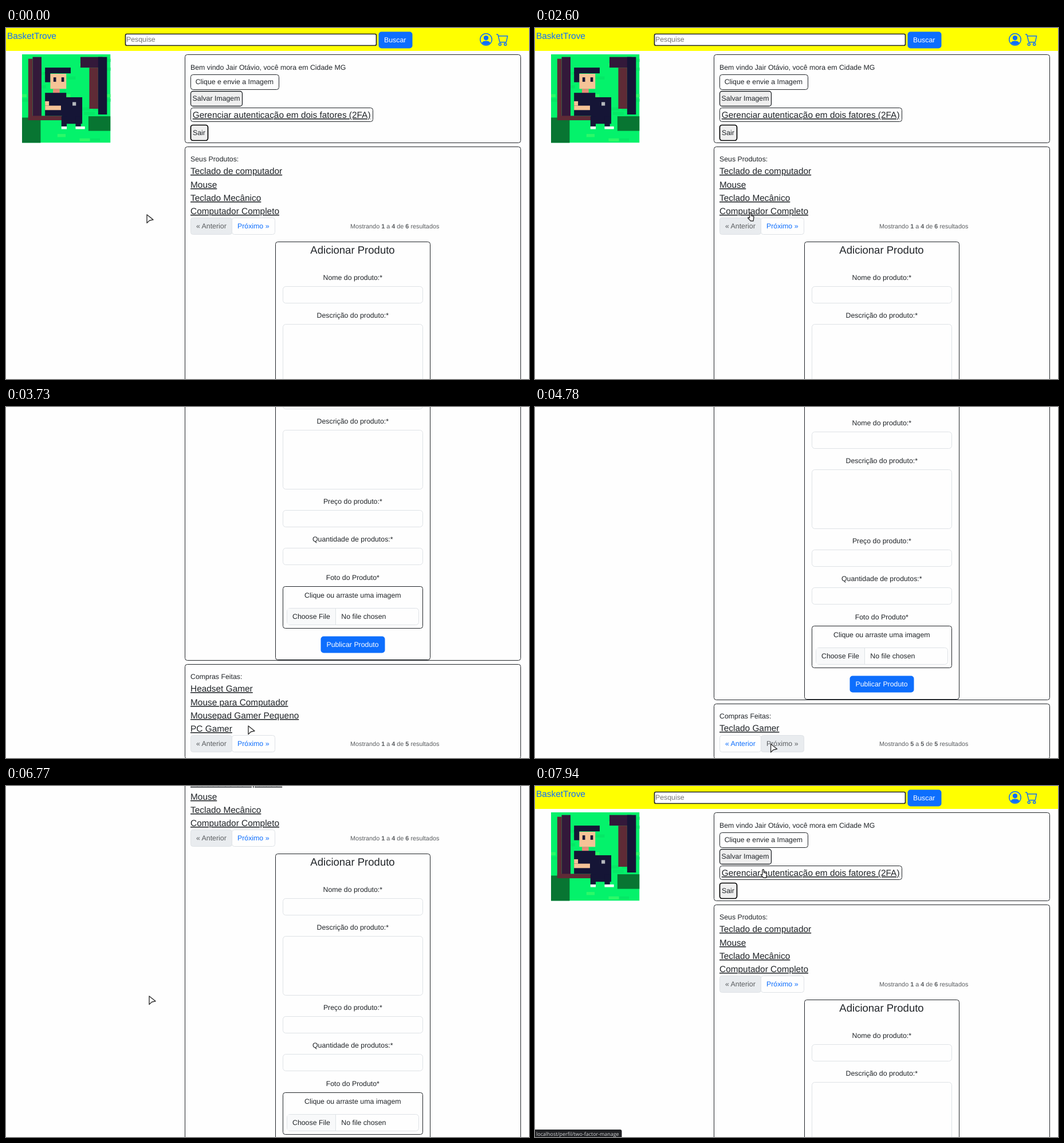
Animation of 913x613 px, one loop 8000 ms. Source, as an HTML page:

```html
<!DOCTYPE html>
<html lang="pt-BR">
<head>
<meta charset="utf-8">
<style>
html, body { margin: 0; width: 100%; height: 100%; overflow: hidden; background: #fefefe; }
svg { display: block; }
text { font: 12.34px "Liberation Sans", Arial, sans-serif; fill: #212529; text-rendering: geometricPrecision; }
.link { font-size: 15.42px; text-decoration: underline; }
.brand { font-size: 15.42px; }
.title { font-size: 18.55px; }
.small { font-size: 10.83px; }
.mid { text-anchor: middle; }
.muted { fill: #595c5f; }
.hint { fill: #757575; }
.blue { fill: #0d6efd; }
.white { fill: #fff; }
.box { fill: #fefefe; stroke: #212529; }
.button { fill: #efefef; stroke: #212529; stroke-width: 1.3; }
.strong { fill: #efefef; stroke: #000; stroke-width: 1.7; }
.search { fill: #fff; stroke: #212529; stroke-width: 1.7; }
.field { fill: #fefefe; stroke: #dee2e6; }
.off { fill: #e9ecef; stroke: #dee2e6; }
.icon { fill: none; stroke: #0d6efd; stroke-width: 1.5; stroke-linejoin: round; }
#cursor { pointer-events: none; }
#cursor path { fill: #fff; stroke: #333; stroke-width: 1.4; stroke-linejoin: round; }
#status text { font: 8.92px "Open Sans", sans-serif; fill: #d6d7d9; }
</style>
</head>
<body>
<svg width="913" height="613">
  <g id="page"></g>
  <g id="status"><rect x="-4" y="600" height="20" rx="3" fill="#202124"/><text x="2" y="611"></text></g>
  <g id="cursor">
    <path id="arrow" d="M1 1V15.5L5.5 11.3L12 9.8Z"/>
    <path id="hand" d="M4 9V2a1.3 1.3 0 0 1 2.6 0V6l5 1.5-1 7.8H6L1.4 10.6q-.7-2.2 2.6-.6z"/>
  </g>
</svg>
<script>
const LOOP = 8000, ROW = 23.1, SECTION = 719, BOTTOM = 477;
const $ = id => document.getElementById(id);
const crisp = v => Math.floor(v) + .5;
const rect = (cls, x, y, w, h, r = 4) =>
  `<rect class="${cls}" x="${crisp(x)}" y="${crisp(y)}" width="${Math.round(w)}" height="${Math.round(h)}" rx="${r}"/>`;
const block = (color, x, y, w, h) =>
  `<rect fill="${color}" x="${x}" y="${y}" width="${w}" height="${h}"/>`;
const text = (cls, x, y, s) => `<text class="${cls}" x="${x}" y="${Math.round(y)}">${s}</text>`;
const label = (y, s) => text('mid', 605.3, y, s);
const shift = (y, content) => `<g transform="translate(0 ${Math.round(y)})">${content}</g>`;

// Pixel-art portrait on a grid of 20 by 20 cells
function avatar() {
  const navy = '#151536', bark = '#5f2b36', shade = '#33193a', skin = '#f5c396', leaf = '#087532';
  const noise = n => { const v = Math.sin(n * 91.7) * 4375.5; return v - Math.floor(v); };
  let out = block('#04f26b', 0, 0, 20, 20);
  for (let i = 1; i < 34; i++)
    out += block(i % 4 ? '#05e766' : '#2cf968', Math.floor(noise(i) * 20), Math.floor(noise(i + 50) * 20), 1 + noise(i) * 2, .7);
  out += block(leaf, 0, 14.3, 4.2, 6) + block(leaf, 15, 14, 5, 3.3) +
    block(shade, 2.4, .6, 2, 13.4) + block(bark, 1.4, 1, 1, 13.8) + block(bark, 1.4, 13.9, 7.6, 1) +
    block(shade, 13.2, .6, 5, 2.4) + block(bark, 15.2, 3, 2, 9.3) + block(navy, 17.2, .6, 2, 13) +
    block(navy, 5.2, 3, 5.8, 1.3) + block(navy, 5.2, 4, 1.2, 2.3) +
    block(skin, 6.4, 4.4, 3.6, 3.4) + block('#e58d78', 7, 7.8, 1.5, 1) +
    block(navy, 5.2, 8.7, 4.8, 5.2) + block(navy, 9, 9.7, 4.6, 6) +
    block(skin, 5.2, 11.6, 3.6, 1) + block(skin, 5.2, 10.6, .9, 1) + block('#b5b8bd', 11.4, 10.8, .8, .8);
  for (const x of [7.1, 8.9]) out += block(navy, x, 5.2, .6, 1);
  for (const [x, w] of [[8.9, 1.2], [12.1, 2.1]])
    out += block(navy, x, 14, 1.2, 2.3) + block('#fff', x, 16.3, w, .6);
  return `<svg x="28" y="46" width="154.5" height="154.5" viewBox="0 0 20 20">${out}</svg>`;
}

const header =
  block('#ff0', 0, 0, 913, 40) + text('brand blue', 2, 19, 'BasketTrove') +
  rect('search', 208, 10, 438, 20, 2.5) + text('hint', 210, 24, 'Pesquise') +
  rect('blue', 650, 6, 59, 29, 5) + text('white', 660, 25, 'Buscar') +
  `<circle class="icon" cx="838" cy="20" r="10.2"/><circle class="blue" cx="838" cy="17.3" r="4.1"/>
  <path class="blue" d="M830.5 26q2-3.4 7.5-3.4t7.5 3.4a10 10 0 0 1-15 0z"/>
  <path class="icon" d="M856 11.3h2.7l3.2 13.4h11.4l2.3-10.8H859.5"/>
  <circle class="icon" cx="862.3" cy="28.4" r="2"/><circle class="icon" cx="871.7" cy="28.4" r="2"/>`;

const profile =
  rect('box', 312, 46, 586, 154) +
  text('', 322, 73, 'Bem vindo Jair Otávio, você mora em Cidade MG') +
  rect('box', 322, 81, 154, 26) + text('', 330.7, 98, 'Clique e envie a Imagem') +
  rect('button', 322, 110, 90, 26) + text('', 325.6, 127, 'Salvar Imagem') +
  rect('box', 322, 139, 318, 24) + text('link hot', 325.7, 157, 'Gerenciar autenticação em dois fatores (2FA)') +
  rect('strong', 322, 169, 30, 27) + text('', 326, 187, 'Sair');

function productForm() {
  let y = 439.6;
  let out = rect('box', 470, 373, 270, 545) + text('title mid', 605, 394, 'Adicionar Produto');
  for (const name of ['Nome do produto:*', 'Descrição do produto:*', 'Preço do produto:*', 'Quantidade de produtos:*']) {
    const h = name.startsWith('Desc') ? 103 : 29.2;
    out += label(y, name) + rect('field', 483.5, y + 11.5, 244, h, 5);
    y += h + 37.1;
  }
  return out + label(y, 'Foto do Produto*') + rect('box', 483, y + 12, 244, 73) +
    label(y + 31.5, 'Clique ou arraste uma imagem') +
    rect('field', 490, y + 49.5, 230, 29, 5) + block('#f8f9fa', 491, 829, 84, 28) +
    block('#dee2e6', 575, 829, 1, 28) +
    text('', 500, y + 68, 'Choose File') + text('', 585.3, y + 68, 'No file chosen') +
    rect('blue', 549, 877, 112, 29, 5) + text('white mid', 605, 895.6, 'Publicar Produto');
}

function pager(last, from, to, total) {
  const bold = v => `<tspan font-weight="bold">${v}</tspan>`;
  const half = (disabled, x, w, s) =>
    rect(disabled ? 'off' : 'field hot', x, 331, w, 29) +
    text(disabled ? 'muted' : 'blue hot', x + 10, 350, s);
  return half(!last, 322, 72, '« Anterior') + half(last, 394, 75, 'Próximo »') +
    text('small muted', 601, 350, `Mostrando ${bold(from)} a ${bold(to)} de ${bold(total)} resultados`);
}

function section(title, items, last, height, extra) {
  const visible = last ? items.slice(4) : items.slice(0, 4);
  const gap = (visible.length - 4) * ROW;
  return rect('box', 312, 207, 586, height + gap) + text('', 322, 233, title) +
    visible.map((s, i) => text('link hot', 322, 255.4 + i * ROW, s)).join('') +
    shift(gap, pager(last, last ? 5 : 1, last ? items.length : 4, items.length) + extra);
}

const products = ['Teclado de computador', 'Mouse', 'Teclado Mecânico', 'Computador Completo', 'Pratos', 'Panela'];
const orders = ['Headset Gamer', 'Mouse para Computador', 'Mousepad Gamer Pequeno', 'PC Gamer', 'Teclado Gamer'];
const render = (productsLast, ordersLast) =>
  header + avatar() + profile +
  section('Seus Produtos:', products, productsLast, 712, productForm()) +
  shift(SECTION - (productsLast ? 2 * ROW : 0), section('Compras Feitas:', orders, ordersLast, 165, ''));

// Smooth 0 to 1 between two times
function ease(t, start, end) {
  const p = Math.min(1, Math.max(0, (t - start) / (end - start)));
  return p * p * (3 - 2 * p);
}

function scrollAt(t, ordersLast) {
  const y = BOTTOM * ease(t, 2840, 3569) - 222 * ease(t, 5600, 5985) - 255 * ease(t, 6770, 7200);
  return Math.round(Math.min(y, ordersLast ? BOTTOM - 3 * ROW : BOTTOM));
}

// Each move: start, end, then the place reached
const moves = [
  [130, 820, 445, 351], [1020, 1510, 351, 316], [1510, 1790, 352, 302],
  [2190, 2950, 385, 337], [3020, 3730, 422, 556], [3730, 4000, 421, 587],
  [4710, 4990, 356, 590], [5320, 5660, 362, 599], [5660, 6770, 249, 366], [6840, 7940, 393, 145]
];
function cursorAt(t) {
  let x = 245, y = 325;
  for (const [start, end, toX, toY] of moves) {
    const p = ease(t, start, end);
    x += (toX - x) * p;
    y += (toY - y) * p;
  }
  return [x, y];
}

function setStatus(message, width, opacity) {
  const [bar, words] = $('status').children;
  bar.setAttribute('width', width + 4);
  words.textContent = message;
  $('status').setAttribute('opacity', opacity);
}

let shown;
function frame(now) {
  const t = now % LOOP;
  const productsLast = t >= 1090 && t < 2190, ordersLast = t >= 4150 && t < 5320;
  const state = `${productsLast} ${ordersLast}`;
  if (state !== shown) $('page').innerHTML = render(productsLast, ordersLast);
  shown = state;
  $('page').setAttribute('transform', `translate(0 ${-scrollAt(t, ordersLast)})`);

  const [x, y] = cursorAt(t);
  $('cursor').setAttribute('transform', `translate(${x} ${y})`);
  const over = document.elementFromPoint(x + 3, y + 1);
  const hand = Boolean(over && over.closest('.hot'));
  $('hand').style.display = hand ? '' : 'none';
  $('arrow').style.display = hand ? 'none' : '';

  if (t >= 7600) setStatus('localhost/perfil/two-factor-manage', 151.5, 1);
  else if (t >= 5390) setStatus('localhost/produto/12', 94.5, .45 * (1 - ease(t, 5680, 5760)));
  else setStatus('', 0, 0);
  requestAnimationFrame(frame);
}
requestAnimationFrame(frame);
</script>
</body>
</html>
```
